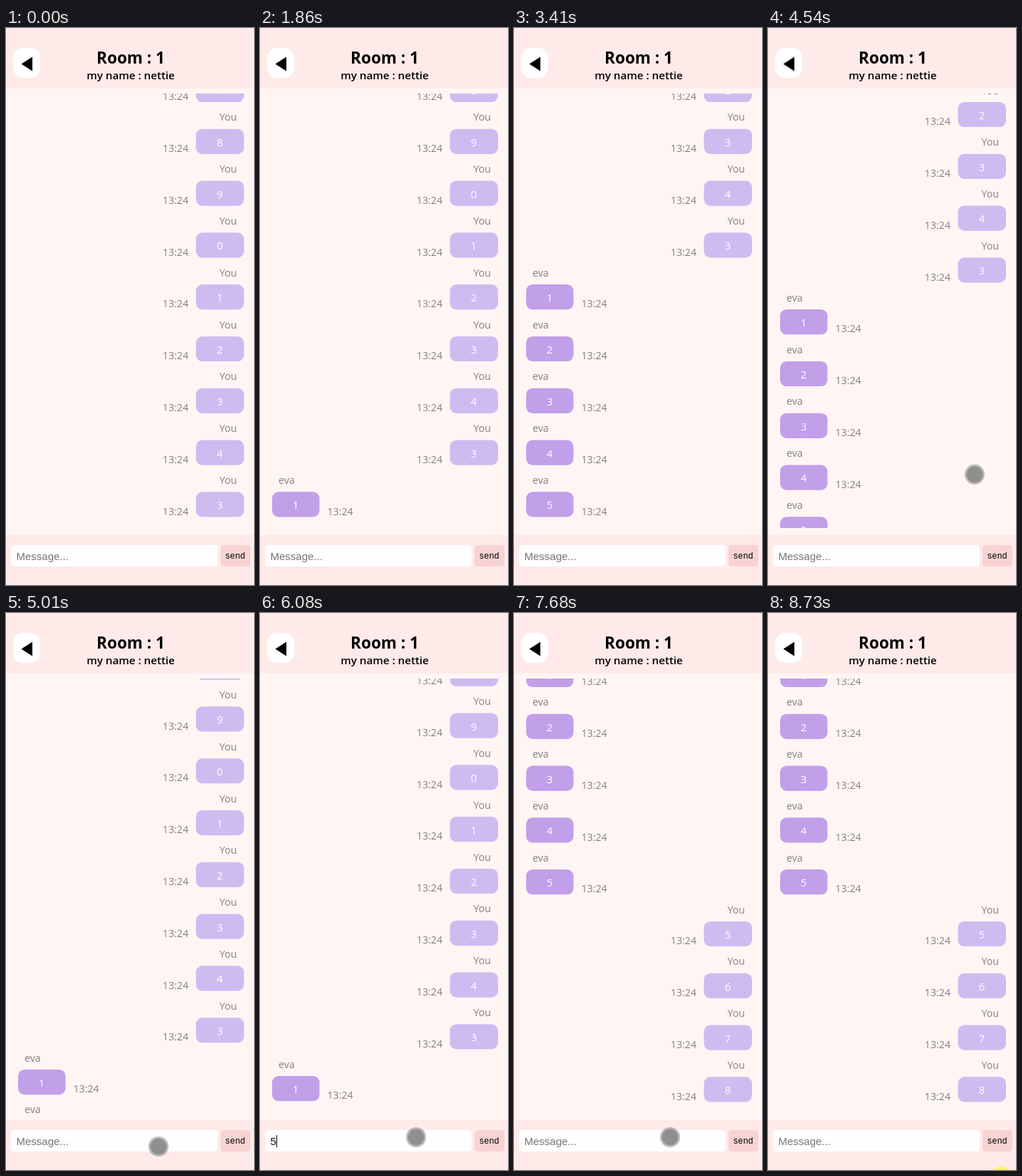
An HTML page for the animation above (8.82 s loop, 348 px wide and 782 px high).

```html
<!DOCTYPE html>
<html lang="en">
<head>
<meta charset="utf-8">
<title>Chat room</title>
<style>
  html, body { margin: 0; width: 100%; height: 100%; overflow: hidden; background: #fff6f4; }
  svg { display: block; width: 348px; height: 782px; }
  text { font-family: "Open Sans", "Noto Sans", sans-serif; font-size: 14.2px; }
  .title { font-size: 22.5px; font-weight: 700; text-anchor: middle; }
  .sub { font-size: 15.2px; font-weight: 600; text-anchor: middle; }
  .info { fill: #808080; }
  .digit { fill: #fff; font-size: 15px; text-anchor: middle; }
  .end { text-anchor: end; }
  .field { font-family: "Liberation Sans", Arial, sans-serif; font-size: 15px; }
  .send { font-family: "Liberation Sans", Arial, sans-serif; font-size: 12px; letter-spacing: .5px; }
</style>
</head>
<body>
<svg viewBox="0 0 348 782">
  <clipPath id="view"><rect y="92" width="348" height="610"/></clipPath>
  <rect width="348" height="782" fill="#fff6f4"/>
  <g clip-path="url(#view)"><g id="list"></g></g>

  <rect width="348" height="85" fill="#ffeaea"/>
  <rect x="10" y="28" width="38" height="42" rx="14" fill="#fff"/>
  <path d="M21.5 50.5L37 40.5V60.5Z"/>
  <text class="title" x="175" y="50">Room : 1</text>
  <text class="sub" x="175" y="72">my name : nettie</text>

  <rect y="711.5" width="348" height="70.5" fill="#ffeaea"/>
  <rect x="7" y="726" width="290" height="30" rx="4.5" fill="#fffefe"/>
  <rect x="301" y="726" width="42" height="30" rx="4.5" fill="#f8d3d3"/>
  <text class="send" x="308" y="745">send</text>
  <text class="field" id="field" x="14.5" y="747"></text>
  <rect id="caret" y="733" width="1" height="17"/>

  <circle id="glow" r="16.5" fill="#fdf07c"/>
  <g id="touch">
    <circle r="14" fill="#777" fill-opacity=".5"/>
    <circle r="11.3" fill="#8b8b8b" fill-opacity=".92"/>
  </g>
</svg>
<script>
const LOOP = 8820, FRAME = 66.7, BLINK = 525;
const PITCH = 72.8, LAST_TOP = 651.3;
const $ = id => document.getElementById(id);

const chat = (digits, mine) => [...digits].map(digit => ({ digit, mine }));
const history = chat("789012343", true);
const messages = [...history, ...chat("12345", false), ...chat("5678", true)];

const received = [1860, 2190, 2520, 2790, 3070];
const FOCUS = 5230;
const posts = [
  { key: 6080, send: 6280, digit: "5" },
  { key: 6540, send: 6620, digit: "6" },
  { key: 6820, send: 6950, digit: "7" },
  { key: 7150, send: 7280, digit: "8" }
];
const arrivals = [...received, ...posts.map(p => p.send)];

// Pointer key points: time, x, y
const path = [[3340, 284, 564], [4400, 284, 570], [4536, 290, 627], [4736, 332, 763],
  [5002, 214, 749], [5400, 219, 736], [8000, 219, 736], [8140, 275, 651], [8400, 328, 770]];

const clamp = v => Math.min(1, Math.max(0, v));
const within = (t, from, to) => t >= from && t < to;
const smooth = v => v * v * (3 - 2 * v);
const move = (el, x, y) => el.setAttribute("transform", `translate(${x} ${y})`);

function along(t) {
  const i = Math.max(1, path.findIndex(p => p[0] > t));
  const [a, b] = t < path.at(-1)[0] ? [path[i - 1], path[i]] : path.slice(-2);
  const p = clamp((t - a[0]) / (b[0] - a[0]));
  return [1, 2].map(k => a[k] + (b[k] - a[k]) * p);
}

function add(parent, tag, attrs, text = "") {
  const el = document.createElementNS("http://www.w3.org/2000/svg", tag);
  for (const key in attrs) el.setAttribute(key, attrs[key]);
  el.textContent = text;
  return parent.appendChild(el);
}

const rows = messages.map(({ digit, mine }, i) => {
  const row = add($("list"), "g", { transform: `translate(0 ${i * PITCH})` });
  const side = mine ? "info end" : "info";
  add(row, "text", { class: side, x: mine ? 324 : 26, y: -11.3 }, mine ? "You" : "eva");
  add(row, "rect", { x: mine ? 266.5 : 17, width: mine ? 67.5 : 66.5, height: 35.2, rx: 9,
    fill: mine ? "#cfbbf0" : "#c29fe9" });
  add(row, "text", { class: "digit", x: mine ? 300 : 50, y: 24 }, digit);
  add(row, "text", { class: side, x: mine ? 256 : 94.5, y: 32.3 }, "13:24");
  return row;
});

function drawList(t, step) {
  const count = history.length + arrivals.filter(a => a <= t).length;
  const pulled = t < posts[0].send ? 290 * smooth(clamp((step - 4386) / 690)) : 0;
  move($("list"), 0, LAST_TOP - (count - 1) * PITCH + pulled);
  rows.forEach((row, i) => row.style.display = i < count ? "" : "none");
}

function drawField(t) {
  const draft = posts.find(p => within(t, p.key, p.send));
  $("field").textContent = draft ? draft.digit : "Message...";
  $("field").setAttribute("fill", draft ? "#111" : "#757575");

  const lastKey = [FOCUS, ...posts.map(p => p.key)].findLast(k => k <= t);
  const lit = t >= FOCUS && Math.floor((t - lastKey) / BLINK) % 2 === 0;
  $("caret").setAttribute("x", draft ? 23 : 14.5);
  $("caret").style.opacity = lit ? 1 : 0;
}

function drawPointer(t, step) {
  const shown = within(t, 3340, 3410) || within(t, 4400, 8470);
  $("touch").style.display = shown ? "" : "none";
  move($("touch"), ...along(step));

  const leaving = t >= 8670;
  const fade = within(t, 130, 320) ? (320 - t) / 190 : 0;
  $("glow").style.opacity = leaving ? 1 : fade;
  move($("glow"), leaving ? 327 : 271.5, leaving ? 793.5 : 772.5);
}

function draw(t) {
  const step = Math.floor(t / FRAME) * FRAME;
  drawList(t, step);
  drawField(t);
  drawPointer(t, step);
}

const start = performance.now();
function tick() {
  draw((performance.now() - start) % LOOP);
  requestAnimationFrame(tick);
}
tick();
</script>
</body>
</html>
```
